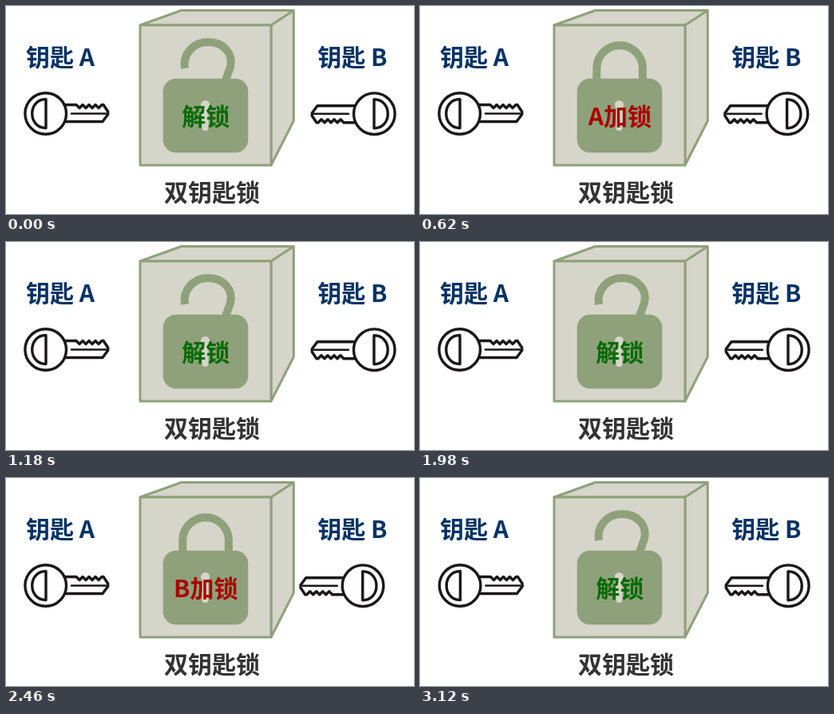
These frames come from a looping animation (511 px wide and 260 px high, 4 s). An HTML page:

```html
<!DOCTYPE html>
<html lang="zh-CN">
<head>
<meta charset="utf-8">
<title>双钥匙锁</title>
<style>
html, body { margin: 0; width: 100%; height: 100%; overflow: hidden; background: #fff; }
svg { display: block; }
text { font: bold 30px "Noto Sans CJK SC", "Noto Sans CJK", "Noto Sans CJK JP", sans-serif; text-anchor: middle; }
.label { fill: #053366; }
.box { fill: #d6d5ca; stroke: #8fa17b; stroke-width: 3; stroke-linejoin: round; }
.shackle { fill: none; stroke: #8fa17b; stroke-width: 10; stroke-linecap: butt; }
.key { fill: #fff; stroke: #1b1718; stroke-width: 3.4; stroke-linejoin: round; stroke-linecap: round; }
.thin { fill: none; stroke-width: 2.6; }
</style>
</head>
<body>
<svg width="511" height="260" viewBox="0 0 511 260">
  <defs>
    <g id="key" class="key">
      <path d="M73 123.5H88l4 4 4-4 4 4 4-4 4 4 4-4 4 4 4-4H122L127.7 132V135.5L121 144.5H73Z"/>
      <path class="thin" d="M82 134.5H125"/>
      <circle cx="49.7" cy="134.5" r="25.8"/>
      <path d="M50 116.5V152.5C27 152.5 27 116.5 50 116.5Z"/>
    </g>
  </defs>

  <g class="box">
    <path d="M168 24L219.5 5.5H360.3V143.5L332 199V24Z"/>
    <path d="M168 24H332V199H168ZM332 24L360.3 5.5"/>
  </g>
  <path id="shackle" class="shackle"/>
  <rect x="196.7" y="90.7" width="106.6" height="92.6" rx="16" fill="#8fa17b"/>
  <path d="M249.5 123V152" stroke="#d6d5ca" stroke-width="8" stroke-linecap="round"/>
  <circle cx="249.5" cy="123.5" r="5.5" fill="#d6d5ca"/>
  <text id="state" x="250.3" y="149.3"></text>

  <text class="label" x="68" y="74.6">钥匙 A</text>
  <text class="label" x="433.8" y="74.6">钥匙 B</text>
  <text x="258" y="243.8" fill="#333">双钥匙锁</text>

  <use id="keyA" href="#key"/>
  <use id="keyB" href="#key"/>
</svg>
<script>
const LOOP = 4000, STEP = 20, REACH = 80;
const OPEN = "M224 78C221 61 234 45 253 45C273 45 285 60 281 76L275 93";
const SHUT = "M221.3 94V78A28.8 28.8 0 0 1 278.9 78V94";

// Each turn: key, start, end, lock text once the key has reached the lock
const turns = [
  ["A", 0, 580, "A加锁"],
  ["B", 580, 1190, "解锁"],
  ["B", 1975, 2590, "B加锁"],
  ["A", 2590, 3140, "解锁"]
];

const el = id => document.getElementById(id);
const [shackle, state, keyA, keyB] = ["shackle", "state", "keyA", "keyB"].map(el);

// Speeds up towards the lock, then slows down on the way home
function travel(t, start, end) {
  if (t <= start || t >= end) return 0;
  const u = Math.min(t - start, end - t) / ((end - start) / 2);
  return REACH * u * u;
}

function draw(t) {
  const shift = { A: 0, B: 0 };
  let text = "解锁";
  for (const [key, start, end, result] of turns) {
    shift[key] += travel(t, start, end);
    if (t >= (start + end) / 2) text = result;
  }
  const open = text === "解锁";
  shackle.setAttribute("d", open ? OPEN : SHUT);
  state.textContent = text;
  state.setAttribute("fill", open ? "#066b06" : "#aa0000");
  keyA.setAttribute("transform", `translate(${shift.A} 0)`);
  keyB.setAttribute("transform", `translate(${-shift.B} 0) rotate(180 255.5 134.6)`);
}

const began = performance.now();
function tick() {
  const t = (performance.now() - began) % LOOP;
  draw(Math.floor(t / STEP) * STEP);
  requestAnimationFrame(tick);
}
draw(0);
requestAnimationFrame(tick);
</script>
</body>
</html>
```
